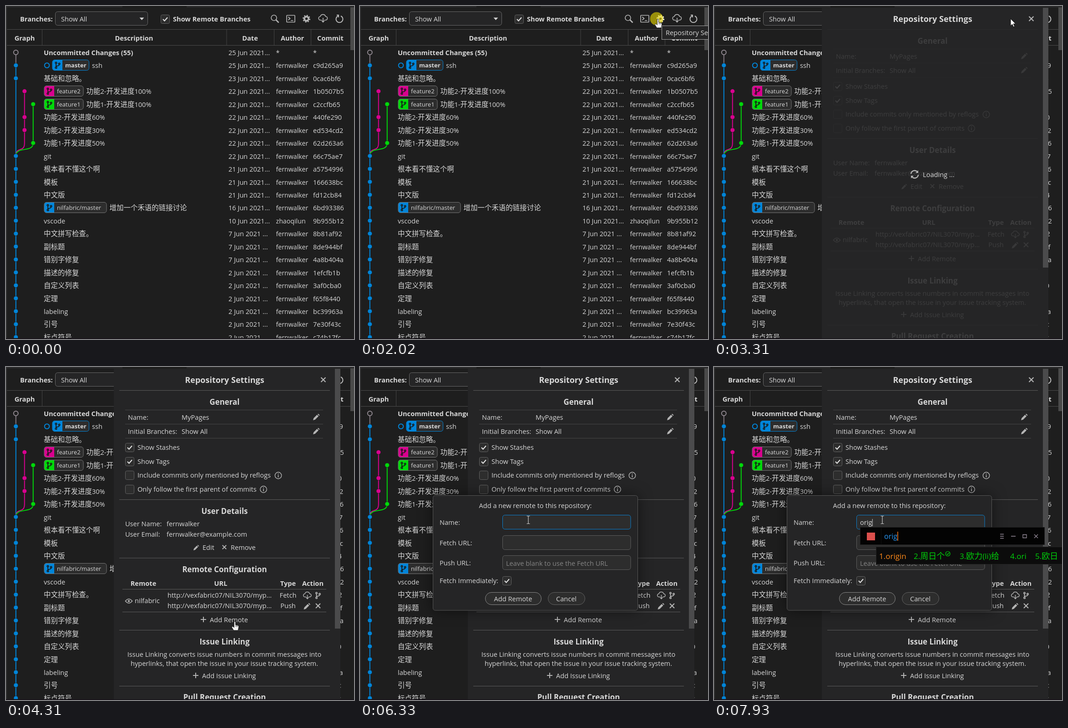
Animation of 765 by 732 pixels, one loop 8 s. Source, as an HTML page:

```html
<!DOCTYPE html>
<html lang="zh-CN">
<head>
<meta charset="utf-8">
<title>Git graph: add a remote</title>
<style>
html, body { margin: 0; width: 100%; height: 100%; overflow: hidden; background: #1e1e1e; }
svg { display: block; width: 100%; height: 100%; }
text { font: 14.6px "Open Sans", "Noto Sans CJK SC", sans-serif; fill: #d8d8d8; white-space: pre; }
.cjk { font-family: "Noto Sans CJK SC", sans-serif; font-size: 1.06em; }
.b { font-weight: 700; font-size: 14.6px; }
.m { text-anchor: middle; }
.title { font-size: 18px; }
.head { font-size: 16.9px; }
.tag { font-size: 13.1px; }
.hint { fill: #858585; }
.ime { font-size: 17px; fill: #00cf0a; }
.icon { fill: none; stroke: #b4b4b4; stroke-width: 1.7; }
</style>
</head>
<body>
<svg id="stage" viewBox="0 0 765 732"></svg>
<script>
const LOOP = 8000, ROW = 28.45, TOP = 102;
const BLUE = '#0085d9', PINK = '#d9008f', GREEN = '#00d90a';
const LANES = [21.7, 40.7, 59.7];
const rowY = i => TOP + ROW * i;
const baseline = i => Math.round(rowY(i) + 6);

// Drawing helpers
const text = (x, y, s, cls = '', extra = '') =>
  `<text x="${x}" y="${y}" class="${cls}" ${extra}>${s.replace(/[\u3000-\u9fff]+/g, '<tspan class="cjk">$&</tspan>')}</text>`;
const rect = (x, y, w, h, fill, stroke = 'none', r = 0, sw = 1) =>
  `<rect x="${x}" y="${y}" width="${w}" height="${h}" rx="${r}" fill="${fill}" stroke="${stroke}" stroke-width="${sw}"/>`;
const dot = (x, y, r, fill, stroke = 'none', sw = 2) =>
  `<circle cx="${x}" cy="${y}" r="${r}" fill="${fill}" stroke="${stroke}" stroke-width="${sw}"/>`;
const path = (d, stroke = '#b4b4b4', sw = 2, fill = 'none') =>
  `<path d="${d}" fill="${fill}" stroke="${stroke}" stroke-width="${sw}"/>`;
const group = (id, body) => `<g id="${id}">${body}</g>`;
const at = (x, y, body, scale = 1) => `<g class="icon" transform="translate(${x} ${y}) scale(${scale})">${body}</g>`;
const hline = (x1, x2, y, color = '#5c5c5c') => path(`M${x1} ${y}H${x2}`, color, 1);

const icons = {
  search: '<circle cx="-2" cy="-2" r="6"/><path d="M2.5 2.5L8.500 8.500" stroke-width="2.6"/>',
  terminal: '<rect x="-9" y="-7.500" width="18" height="15" rx="1"/><path d="M-5.500 -4l4 3.500l-4 3.500M0 4h5.500"/>',
  gear: '<circle r="4.600" stroke-width="3.600"/><circle r="7.200" stroke-width="2.600" stroke-dasharray="2.830"/>',
  cloud: '<path d="M-3 4h-2.500a4 4 0 0 1 -.5 -8a6 6 0 0 1 11.500 0a4 4 0 0 1 0 8h-2.500M0 -1v9M-3 5l3 3.500l3 -3.500"/>',
  refresh: '<path d="M3 -7a7.500 7.500 0 1 1 -6 0" stroke-width="2"/><path d="M-6 -9h4v5" stroke-width="2"/>',
  branch: '<circle cx="-3.500" cy="-5" r="1.700"/><circle cx="-3.500" cy="5.500" r="1.700"/><circle cx="3.500" cy="-3" r="1.700"/><path d="M-3.500 -3v6.500M3.500 -1c0 4 -7 1.500 -7 4.500"/>',
  pencil: '<path d="M-7 7l1.200 -4.500l7.500 -7.500l3.300 3.300l-7.500 7.500zM3 -6l1.500 -1.200l3 3l-1.300 1.500z" fill="#b4b4b4" stroke="none"/>',
  cross: '<path d="M-5 -5L5 5M5 -5L-5 5" stroke-width="2.200"/>',
  plus: '<path d="M-6 0H6M0 -6V6" stroke-width="2"/>',
  eye: '<path d="M-7.500 0Q0 -9 7.500 0Q0 9 -7.500 0z"/><circle r="2.300" fill="#b4b4b4" stroke="none"/>',
  info: '<circle r="7.200" stroke-width="1.400"/><path d="M0 -1v5M0 -4.200v1.800"/>',
  tick: '<path d="M-5 0l3.500 3.700l6.500 -7.400" stroke="#e0e0e0" stroke-width="2.200"/>'
};
const icon = (name, x, y, scale) => at(x, y, icons[name], scale);
const checkbox = (x, y, on) => rect(x + .5, y + .5, 19, 19, '#2d2d2d', '#636363', 3) + (on ? icon('tick', x + 10, y + 10) : '');

// Commit table
const me = 'fernwalker';
const rows = [
  ['', '25 Jun 2021...', '*', '*'],
  ['', '25 Jun 2021...', me, 'c9d265a9'],
  ['基础和忽略。', '23 Jun 2021...', me, '0cac6bf6'],
  ['', '22 Jun 2021...', me, '1b0507b5'],
  ['', '22 Jun 2021...', me, 'c2ccfb65'],
  ['功能2-开发进度60%', '22 Jun 2021...', me, '440fe290'],
  ['功能2-开发进度30%', '22 Jun 2021...', me, 'ed534cd2'],
  ['功能1-开发进度50%', '22 Jun 2021...', me, '62d263a6'],
  ['git', '22 Jun 2021...', me, '66c75ae7'],
  ['根本看不懂这个啊', '21 Jun 2021...', me, 'a5754996'],
  ['模板', '21 Jun 2021...', me, '166638bc'],
  ['中文版', '21 Jun 2021...', me, 'fd12cb84'],
  ['', '16 Jun 2021...', me, '6bd93386'],
  ['vscode', '10 Jun 2021...', 'zhaoqilun', '9b955b12'],
  ['中文拼写检查。', '7 Jun 2021 ...', me, '8b81af92'],
  ['副标题', '7 Jun 2021 ...', me, '8de944bf'],
  ['错别字修复', '7 Jun 2021 ...', me, '4a8b404a'],
  ['描述的修复', '2 Jun 2021 ...', me, '1efcfb1b'],
  ['自定义列表', '2 Jun 2021 ...', me, '3af0cba0'],
  ['定理', '2 Jun 2021 ...', me, 'f65f8440'],
  ['labeling', '2 Jun 2021 ...', me, 'bc39963a'],
  ['引号', '2 Jun 2021 ...', me, '7e30f43c'],
  ['标点符号', '2 Jun 2021 ...', me, 'c74b17fc']
];

function tag(row, x, width, color, name, message, head) {
  const y = Math.round(rowY(row) - 12) + .5;
  return rect(x, y, width, 23, '#2d2d2d', 'none', 5) +
    path(`M${x + 22} ${y}h-17a5 5 0 0 0 -5 5v13a5 5 0 0 0 5 5h17z`, 'none', 0, color) +
    `<g style="filter:brightness(.12)">${icon('branch', x + 11.5, y + 11.5)}</g>` +
    rect(x, y, width, 23, 'none', head ? color : '#777', 5) +
    text(x + 28, y + 16.5, name, head ? 'b tag' : 'tag') +
    text(x + width + 6.5, baseline(row), message);
}

function graph() {
  const [main, second, third] = LANES;
  const merge = (x, from) => `M${x} ${rowY(from)}V${rowY(7)}C${x} ${rowY(7.8)} ${main} ${rowY(7.2)} ${main} ${rowY(8)}`;
  const lane = { 3: [second, PINK], 5: [second, PINK], 6: [second, PINK], 4: [third, GREEN], 7: [third, GREEN] };
  let out = path(`M${main} ${TOP + 5}V${rowY(1)}`, '#807880') + path(`M${main} ${rowY(1)}V732`, BLUE) +
    path(merge(second, 3), PINK) + path(merge(third, 4), GREEN) + dot(main, TOP, 5, '#1e1e1e', '#908890');
  for (let i = 1; i < rows.length; i++) {
    const [x, color] = lane[i] || [main, BLUE];
    out += dot(x, rowY(i), 4.9, color, '#1e1e1e', .8);
  }
  return out;
}

function page() {
  const heads = [[41, 'Graph'], [281.5, 'Description'], [536.5, 'Date'], [629.5, 'Author'], [713, 'Commit']];
  return rect(0, 0, 765, 732, '#1e1e1e') + rect(0, 0, 765, 3, '#2a2a2b') + rect(256, 0, 141, 3, '#1c1c1c') +
    rect(0, 0, 2, 732, '#333334') +
    text(31, 34, 'Branches:', 'b') + rect(108.5, 12.5, 203, 30, '#252526', '#696969', 5) + text(121, 34, 'Show All') +
    path('M293.500 25.500h10l-5 5.500z', 'none', 0, '#d4d4d4') +
    checkbox(340, 19, true) + text(367, 34, 'Show Remote Branches', 'b') +
    icon('search', 591, 28) + icon('terminal', 626, 28) + icon('gear', 660.5, 28) + icon('cloud', 697, 27) + icon('refresh', 733, 29) +
    hline(2, 757, 51.5, '#4c4c4c') + hline(2, 757, 86.5, '#4c4c4c') +
    [79.5, 485, 589.5, 670.5].map(x => path(`M${x} 52V86`, '#454545', 1)).join('') +
    heads.map(([x, s]) => text(x, 76, s, 'b m')).join('') + graph() +
    rows.map(([desc, date, author, hash], i) => {
      const y = baseline(i);
      return text(83, y, desc) + text(489, y, date) + text(593.5, y, author, '', 'style="font-size:14.2px"') + text(675, y, hash);
    }).join('') +
    text(83, baseline(0), 'Uncommitted Changes (55)', 'b') +
    dot(90, rowY(1), 5.3, 'none', BLUE) +
    tag(1, 102, 80.5, BLUE, 'master', 'ssh', true) +
    tag(3, 84, 86, PINK, 'feature2', '功能2-开发进度100%') +
    tag(4, 84, 86, GREEN, 'feature1', '功能1-开发进度100%') +
    tag(12, 84, 137, BLUE, 'nilfabric/master', '增加一个禾语的链接讨论') +
    rect(757, 3, 8, 94, '#4a4a4a') + rect(0, 730, 765, 2, '#19151b');
}

function settings() {
  const options = ['Show Stashes', 'Show Tags', 'Include commits only mentioned by reflogs', 'Only follow the first parent of commits'];
  const heading = (y, s) => text(480.5, y, s, 'b m head');
  return [51.5, 291.5, 420, 578.5, 701.5].map(y => hline(249, 712, y)).join('') +
    [94.5, 125.5, 156.5].map(y => hline(262, 697, y, '#464646')).join('') +
    [488.5, 538.5].map(y => hline(256, 704, y)).join('') +
    heading(83, 'General') +
    text(268, 116, 'Name:') + text(386, 116, 'MyPages') + icon('pencil', 682, 110) +
    text(268, 147, 'Initial Branches:') + text(386, 147, 'Show All') + icon('pencil', 682, 141) +
    options.map((s, i) => checkbox(262, Math.round(167 + 30.6 * i), i < 2) + text(289, Math.round(182 + 30.7 * i), s)).join('') +
    icon('info', 598.5, 238.5) + icon('info', 566, 269) +
    heading(323, 'User Details') +
    text(262, 350, 'User Name:') + text(353, 350, me) +
    text(262, 373, 'User Email:') + text(353, 373, me + '@example.com') +
    icon('pencil', 418, 397, .85) + text(432, 402, 'Edit') + icon('cross', 480, 396, .85) + text(494, 402, 'Remove') +
    heading(451, 'Remote Configuration') +
    [[302, 'Remote'], [472, 'URL'], [620, 'Type'], [674.5, 'Action']].map(([x, s]) => text(x, 481, s, 'b m')).join('') +
    icon('eye', 270, 514.5) + text(283, 519, 'nilfabric') +
    [507, 530].map(y => text(355, y, 'http://vexfabric07/NIL3070/myp...')).join('') +
    text(620, 507, 'Fetch', 'm') + text(620, 530, 'Push', 'm') +
    icon('cloud', 662.5, 502, .9) + icon('branch', 686, 502) + icon('pencil', 661.5, 526) + icon('cross', 686, 525) +
    icon('plus', 434, 555) + text(448, 561, 'Add Remote') +
    heading(610, 'Issue Linking') +
    text(480, 637, 'Issue Linking converts issue numbers in commit messages into', 'm') +
    text(480, 657, 'hyperlinks, that open the issue in your issue tracking system.', 'm') +
    icon('plus', 417, 678) + text(431, 684, 'Add Issue Linking') +
    heading(732, 'Pull Request Creation');
}

const panel = () => rect(237, 4, 498, 728, '#252526') + group('content', settings()) +
  group('scrollbar', rect(723, 4, 12, 571, '#4b4b4c')) +
  group('title', text(480.5, 35, 'Repository Settings', 'b m title')) +
  group('close', icon('cross', 697.5, 28)) +
  group('loading', at(441, 370, group('spinner',
    '<path d="M-8 -1a8 8 0 0 1 14 -4.500M8 1a8 8 0 0 1 -14 4.500" stroke-width="2.400"/><path d="M8 -9v6h-6zM-8 9v-6h6z" fill="#b4b4b4" stroke="none"/>')) +
    text(459, 376, 'Loading ...')) + rect(237, 730, 498, 2, '#1b181d');

function dialog() {
  const field = (y, label, stroke = '#5e5e5e') => text(175, y + 22, label) + rect(313.5, y + .5, 281.5, 31, '#2d2d2d', stroke, 5);
  const button = (x, w, label, stroke) => rect(x + .5, 495.5, w, 27, '#2d2d2d', stroke, 13.5) + text(x + w / 2, 514.5, label, 'm');
  return `<g style="filter:drop-shadow(0 0 15px rgba(0,0,0,.5))">${rect(160.5, 282.5, 450, 252.5, '#252526', '#565656', 5)}</g>` +
    text(385.5, 310, 'Add a new remote to this repository:', 'm') +
    field(325, 'Name:', '#0a80d0') + field(370, 'Fetch URL:') + field(414, 'Push URL:') +
    text(321, 437, 'Leave blank to use the Fetch URL', 'hint') +
    text(175, 475, 'Fetch Immediately:') + checkbox(313, 460, true) +
    button(275, 123, 'Add Remote', '#8a8a8a') + button(413, 81, 'Cancel', '#636363');
}

// Typing stages: start, end, typed text, window right edge, first colour, candidates as [x, label]
const spread = words => words.map((w, i) => [i ? 411 + 69.3 * (i - 1) : 363, `${i + 1}.${w}`]);
const typing = [
  [7130, 7330, 'o', 549, '#ff5f1f', []],
  [7330, 7530, 'o', 549, '#ff5f1f', spread(['哦', '噢噢', '偶尔', '欧元', '偶然', '偶像', ''])],
  [7530, 7730, 'or', 549, '#ff5f1f', spread(['or', '偶人', '偶然', '欧瑞', '殴辱', '欧日', ''])],
  [7730, 7930, 'ori', 549, '#ff8a1a', spread(['ori', '欧日', '偶日', '欧瑞', '偶人', '偶然', ''])],
  [7930, LOOP, 'orig', 727, '#ff8a1a', [[363, '1.origin'], [439, '2.周日个'], [540, '3.欧力(li)给'], [651, '4.ori'], [706, '5.欧日']]]
];
const caretAt = { o: 8.5, or: 14, ori: 18, orig: 27.3 };

function typed([, , word, right, first, list], i) {
  const dx = caretAt[word];
  return group('typed' + i,
    text(321, 347, word) + path(`M${321 + dx} 334v16`, '#d4d4d4', 1) +
    rect(321.5, 352.5, right - 322, 38, '#030303', '#1b1b1b') + path('M367.500 354v35', '#101010', 1) +
    rect(336, 364, 18, 17, '#dc4f4c') + text(374, 378, word, 'ime', 'style="font-size:16px;fill:#2a96f0"') +
    path(`M${375 + dx * 1.06} 362v20`, '#ff7a1a', 1.5) +
    path(`M${right - 98} 367.500h8m-8 4.500h8m-8 4.500h8M${right - 74} 372h10M${right - 48} 368.500h8v7h-8zM${right - 23} 368l8 8m0 -8l-8 8`, '#968c9a', 1.3) +
    (list.length ? rect(356.5, 395.5, 412, 38, '#0c0c0c', '#222') : '') +
    list.map(([x, s], n) => text(x, 421.5, s, 'ime', n ? '' : `style="fill:${first}"`)).join('') +
    (word === 'orig' ? dot(514, 410.5, 5, 'none', '#00cf0a', 1.2) + path('M511.500 410.500l2 2l3.500 -4', '#00cf0a', 1.2) : ''));
}

const pointers = {
  arrow: path('M0 0V15.500L3.700 12.200L6.300 18L8.700 17L6.200 11.200H11z', '#111', 1, '#fff'),
  hand: path('M-1.700 1.500Q0 -1 1.700 1.500V8L5.500 8.600Q9 9.500 8.700 12L7.200 20H-2.500L-6.500 13.500Q-6.500 10.500 -3.500 12L-1.700 13.500zM2.500 9v3M5.300 9.500v3', '#222', 1, '#f4f4f4'),
  beam: path('M-3.500 -8.500h2.700l.8 .8l.8 -.8h2.700M0 -8v16M-3.500 8.500h2.700l.8 -.8l.8 .8h2.700', '#d0d0d0', 1.2)
};

const CLICK = 'rgba(230,215,0,.62)';
document.getElementById('stage').innerHTML = page() +
  group('hoverDot', dot(LANES[0], rowY(2), 6, BLUE)) +
  group('gearLit', `<g style="filter:brightness(1.3)">${icon('gear', 660.5, 28)}</g>`) +
  group('panel', panel()) + group('dialog', dialog()) +
  group('caret', path('M321.500 333v17', '#d4d4d4', 1)) + typing.map(typed).join('') +
  group('gearClick', dot(652, 28, 14.5, CLICK)) +
  group('addClick', dot(503, 560, 14.5, CLICK)) +
  group('tooltip', rect(663.5, 43.5, 160, 30, '#252526', '#a6a6a6') + text(672, 64, 'Repository Settings')) +
  group('cursor', Object.entries(pointers).map(([name, shape]) => group(name, shape)).join(''));

// Motion: every property holds its value until the next step
function play(id, steps) {
  const frames = steps.map(([ms, style]) => ({ offset: ms / LOOP, easing: 'step-end', ...style }));
  frames.push({ ...steps.at(-1)[1], offset: 1 });
  document.getElementById(id).animate(frames, { duration: LOOP, iterations: Infinity });
}
function show(id, from, to = LOOP) {
  const steps = [[0, { opacity: 0 }], [from, { opacity: 1 }]];
  if (to < LOOP) steps.push([to, { opacity: 0 }]);
  play(id, steps);
}
const move = (x, y) => ({ transform: `translate(${x}px, ${y}px)` });

const route = [
  [0, 724, 147, ''], [600, 724, 147, 'arrow'], [820, 706, 104, 'arrow'], [1010, 684, 66, 'arrow'],
  [1210, 664, 37, 'hand'], [1420, 655, 28, 'hand'], [2430, 652, 28, 'arrow'],
  [3910, 618, 150, 'arrow'], [4110, 540, 430, 'arrow'], [4310, 503, 559, 'hand'],
  [5330, 503, 559, 'arrow'], [5530, 480, 495, 'arrow'], [5730, 432, 410, 'arrow'],
  [5930, 396, 352, 'beam'], [6130, 386, 342, 'beam'], [6330, 370, 336, 'beam']
];
play('cursor', route.map(([ms, x, y]) => [ms, move(x, y)]));
for (const name in pointers) play(name, route.map(([ms, , , shape]) => [ms, { opacity: +(shape === name) }]));

show('hoverDot', 600, 820);
show('gearLit', 1210, 2430);
show('gearClick', 2020, 2230);
show('tooltip', 2020, 2430);
show('panel', 2430);
show('loading', 2430, 3510);
show('scrollbar', 3310);
play('content', [[0, { opacity: 0 }], [3310, { opacity: .14 }], [3510, { opacity: 1 }]]);
play('title', [[0, move(6, 0)], [3310, move(0, 0)]]);
play('close', [[0, move(12, 0)], [3310, move(0, 0)]]);
play('spinner', [0, 2630, 2830, 3030, 3310].map((ms, i) => [ms, { transform: `rotate(${(i - 4) * 50}deg)` }]));
show('addClick', 4730, 5130);
show('dialog', 5130);
show('caret', 6530, 6730);
typing.forEach(([from, to], i) => show('typed' + i, from, to));
</script>
</body>
</html>
```
